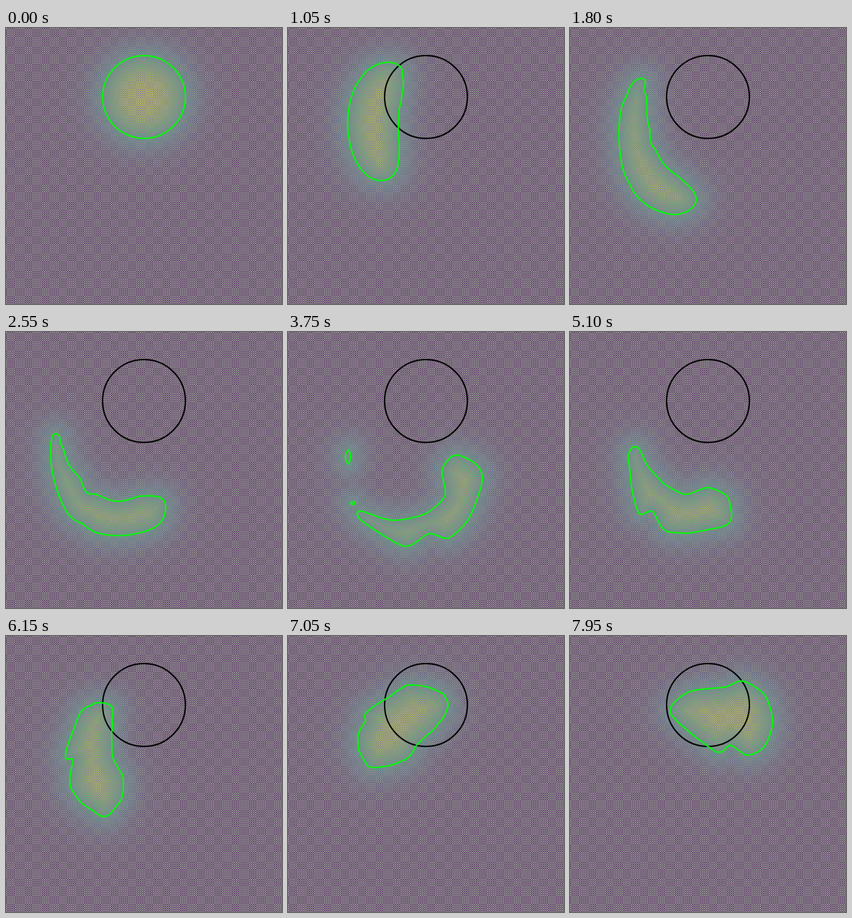
An HTML page with a canvas for the animation above (8000 ms loop, 400 px wide and 400 px high).

```html
<!DOCTYPE html>
<html lang="en">
<head>
<meta charset="utf-8">
<title>Level set in a vortex</title>
<style>
html, body { margin: 0; width: 100%; height: 100%; overflow: hidden; background: #777; }
canvas { display: block; width: 100vw; height: 100vh; }
</style>
</head>
<body>
<canvas id="stage" width="400" height="400"></canvas>
<script>
const SIZE = 400, CELL = 4, N = SIZE / CELL, W = N + 1;
const LOOP = 8000, STEP = 150, TURN = 26, DT = 0.036;
const ctx = document.getElementById('stage').getContext('2d');
const lerp = (a, b, w) => a + (b - a) * w;

// Value of fn at every grid point
function grid(fn) {
  const out = new Float32Array(W * W);
  for (let j = 0; j < W; j++)
    for (let i = 0; i < W; i++) out[j * W + i] = fn(i * CELL, j * CELL, j * W + i);
  return out;
}

function sample(field, x, y) {
  x = Math.max(0, Math.min(N - 0.001, x / CELL));
  y = Math.max(0, Math.min(N - 0.001, y / CELL));
  const i = x | 0, j = y | 0, k = j * W + i;
  return lerp(lerp(field[k], field[k + 1], x - i),
    lerp(field[k + W], field[k + W + 1], x - i), y - j);
}

// Closed cardinal spline through x, y pairs, as line segments
function curve(...xy) {
  const n = xy.length / 2, points = [], tension = 0.38;
  const at = (i, k) => xy[2 * ((i + n) % n) + k];
  for (let i = 0; i < n; i++) {
    for (let s = 0; s < 4; s++) {
      const u = s / 4, u2 = u * u, u3 = u2 * u;
      points.push([0, 1].map(k => {
        const a = at(i, k), b = at(i + 1, k);
        const ta = tension * (b - at(i - 1, k)), tb = tension * (at(i + 2, k) - a);
        return (2 * u3 - 3 * u2 + 1) * a + (u3 - 2 * u2 + u) * ta
          + (3 * u2 - 2 * u3) * b + (u3 - u2) * tb;
      }));
    }
  }
  return points.map((p, i) => [...p, ...points[(i + 1) % points.length]]);
}

const drop = (x, y, rx, ry) => curve(x + rx, y, x, y + ry, x - rx, y, x, y - ry);

function distance(segments, x, y) {
  let best = 1e6;
  for (const [ax, ay, bx, by] of segments) {
    const dx = bx - ax, dy = by - ay, len = dx * dx + dy * dy || 1;
    const u = Math.max(0, Math.min(1, ((x - ax) * dx + (y - ay) * dy) / len));
    const ex = x - ax - u * dx, ey = y - ay - u * dy;
    best = Math.min(best, ex * ex + ey * ey);
  }
  return Math.sqrt(best);
}

function inside(segments, x, y) {
  let hit = false;
  for (const [ax, ay, bx, by] of segments)
    if ((ay > y) !== (by > y) && x < ax + (y - ay) / (by - ay) * (bx - ax)) hit = !hit;
  return hit;
}

const signed = (...loops) => {
  const segments = loops.flat();
  return grid((x, y) => (inside(segments, x, y) ? 1 : -1) * distance(segments, x, y));
};

// Start, turning point and end; the flow carries the shape between them
const poses = [
  { step: 0, field: grid((x, y) => 60 - Math.hypot(x - 200, y - 100)) },
  { step: 25, field: signed(
    curve(242, 178, 272, 191, 282, 215, 262, 271, 232, 299, 204, 292, 169, 311,
      106, 273, 104, 259, 150, 273, 198, 264, 228, 237, 223, 200),
    drop(87, 181, 4, 12), drop(94, 248, 3, 4)) },
  { step: 53, field: signed(
    curve(145, 112, 172, 81, 225, 74, 250, 65, 282, 85, 294, 124, 282, 160,
      257, 173, 232, 158, 212, 168)) }
];

// Vortex flow, reversed at TURN
const flowTime = n => DT * (n < TURN ? n : 2 * TURN - n);

function velocity(x, y) {
  const sx = Math.sin(Math.PI * x), sy = Math.sin(Math.PI * y);
  return [-sx * sx * Math.sin(2 * Math.PI * y), sy * sy * Math.sin(2 * Math.PI * x)];
}

function carried(pose, x, y, now) {
  const span = flowTime(pose.step) - now;
  const count = Math.ceil(Math.abs(span) / 0.04), h = span / (count || 1);
  x /= SIZE;
  y /= SIZE;
  for (let i = 0; i < count; i++) {
    const [u, v] = velocity(x, y);
    const [p, q] = velocity(x + u * h / 2, y + v * h / 2);
    x += p * h;
    y += q * h;
  }
  return sample(pose.field, x * SIZE, y * SIZE);
}

function levelSet(n) {
  const k = n < poses[1].step ? 0 : 1;
  const a = poses[k], b = poses[k + 1], now = flowTime(n);
  const w = ((n - a.step) / (b.step - a.step)) ** 2;
  return grid((x, y) => lerp(carried(a, x, y, now), carried(b, x, y, now), w));
}

// Zero contour of a field, as line segments
function contour(field) {
  const segments = [];
  const cut = (...tri) => {
    const hits = [];
    tri.forEach((p, e) => {
      const q = tri[(e + 1) % 3];
      const a = field[p[1] * W + p[0]], b = field[q[1] * W + q[0]];
      if ((a > 0) !== (b > 0)) {
        const u = a / (a - b);
        hits.push(lerp(p[0], q[0], u) * CELL, lerp(p[1], q[1], u) * CELL);
      }
    });
    if (hits.length) segments.push(hits);
  };
  for (let j = 0; j < N; j++) {
    for (let i = 0; i < N; i++) {
      cut([i, j], [i + 1, j], [i + 1, j + 1]);
      cut([i, j], [i + 1, j + 1], [i, j + 1]);
    }
  }
  return segments;
}

const GRAY = 139, MESH = 0.64, INK = 0.44;
const ramp = [[68, 1, 84], [59, 82, 139], [33, 145, 140], [94, 201, 98], [253, 231, 37]];
const image = ctx.createImageData(SIZE, SIZE);

// Fine mesh in ramp colours over gray
function shade(depth) {
  const px = image.data;
  for (let y = 0, o = 0; y < SIZE; y++) {
    for (let x = 0; x < SIZE; x++, o += 4) {
      const h = 4 / (1 + Math.exp(-sample(depth, x, y) / 14));
      const k = Math.min(3, h | 0);
      const ink = INK * ((Math.floor(x * MESH) + Math.floor(y * MESH)) & 1);
      for (let c = 0; c < 3; c++)
        px[o + c] = lerp(GRAY, lerp(ramp[k][c], ramp[k + 1][c], h - k), ink);
      px[o + 3] = 255;
    }
  }
  ctx.putImageData(image, 0, 0);
}

function draw(n) {
  const field = levelSet(n), edge = contour(field);
  shade(grid((x, y, k) => Math.sign(field[k]) * distance(edge, x, y)));
  ctx.lineWidth = 2;
  ctx.lineCap = 'round';
  ctx.strokeStyle = '#000';
  ctx.beginPath();
  ctx.arc(200, 100, 60, 0, 2 * Math.PI);
  if (n > 0) ctx.stroke();
  ctx.strokeStyle = '#0f0';
  ctx.beginPath();
  for (const [ax, ay, bx, by] of edge) {
    ctx.moveTo(ax, ay);
    ctx.lineTo(bx, by);
  }
  ctx.stroke();
}

const start = performance.now();
let shown = -1;

function tick() {
  const n = Math.floor((performance.now() - start) % LOOP / STEP);
  if (n !== shown) draw(shown = n);
  requestAnimationFrame(tick);
}
tick();
</script>
</body>
</html>
```
